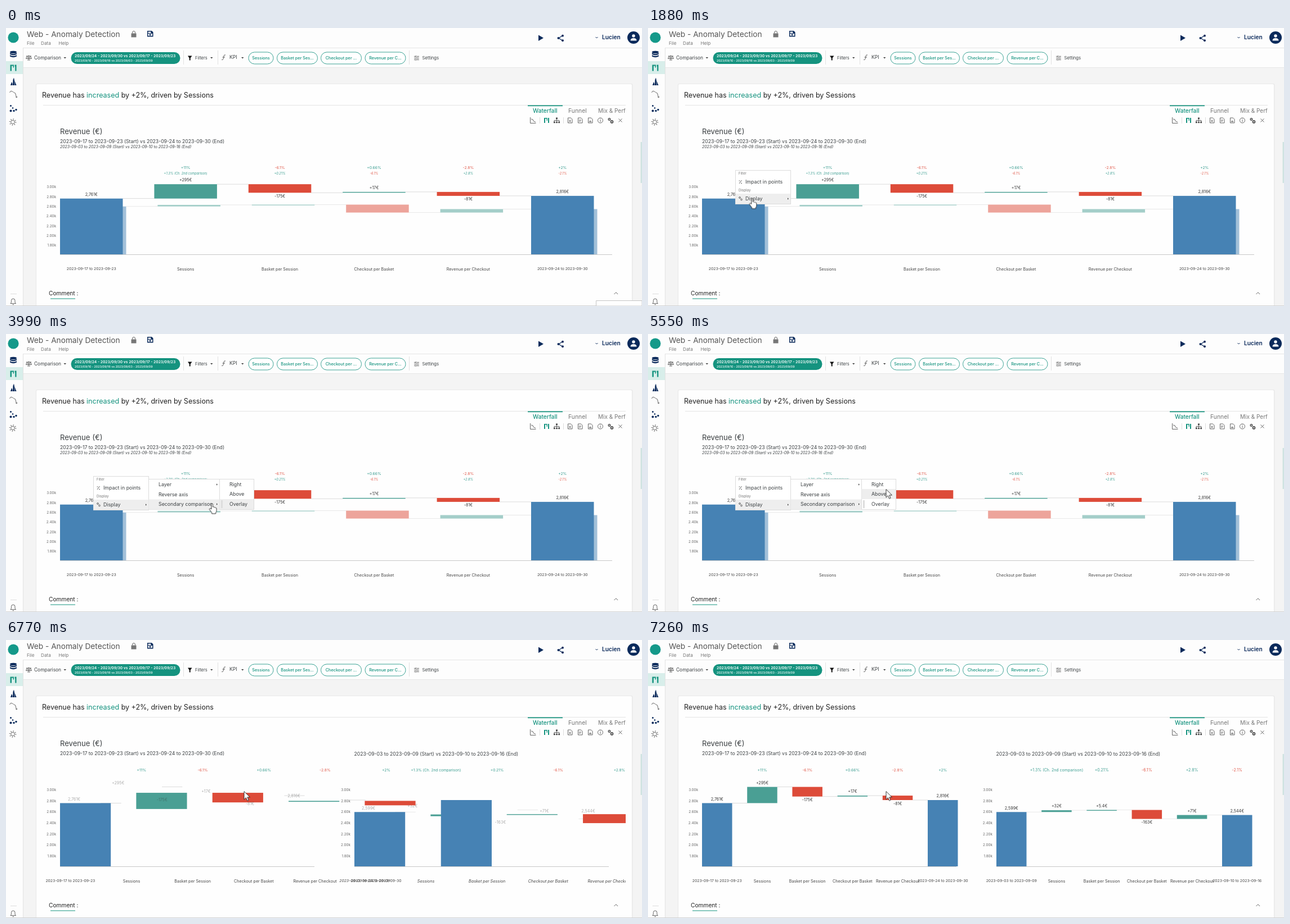
An HTML page that plays this animation: 1130x495 px, repeating every 8000 ms.

```html
<!DOCTYPE html>
<html lang="en">
<head>
<meta charset="utf-8">
<title>Anomaly dashboard</title>
<style>
  html, body { margin: 0; width: 100%; height: 100%; overflow: hidden; background: #f4f4f4; }
  svg { display: block; width: 100%; height: 100%; font-family: Inter, "Open Sans", sans-serif; }
  .navy { fill: #0b2a5b; }
  .line { fill: none; stroke: #555; stroke-width: .9; }
  .teal { fill: #15937f; }
</style>
</head>
<body>
<svg id="stage" viewBox="0 0 1130 495">
  <defs><clipPath id="plot"><rect x="66" y="190" width="1034.500" height="250"/></clipPath></defs>

  <!-- page, header, sidebar -->
  <rect width="1130" height="495" fill="#f4f4f4"/>
  <rect width="1130" height="70" fill="#fdfdfd"/>
  <path d="M31 35.500H1130M31 70.500H1130" stroke="#e6e6e6" fill="none"/>
  <rect width="30" height="495" fill="#fdfdfd"/>
  <path d="M30.500 35V495" stroke="#e2e2e2"/>
  <rect y="59" width="30" height="23" fill="#d8eeea"/>
  <rect x="53" y="99" width="1060.500" height="400" rx="2" fill="#e9e9e9"/>
  <rect x="54" y="100" width="1058" height="400" rx="2" fill="#fefefe"/>
  <rect x="1127.500" y="203" width="2.500" height="73" fill="#cfe3e1"/>

  <!-- sidebar icons -->
  <circle cx="13" cy="17" r="9.600" fill="#15998a"/>
  <g class="navy">
    <path d="M7 43a6 2.300 0 0 1 12 0a6 2.300 0 0 1-12 0M7 44.500q6 3.500 12 0v2.300q-6 3.500-12 0zM7 48.300q6 3.500 12 0v2.300q-6 3.500-12 0z"/>
    <path d="M8 102l2-6 1.500 3v3zM12 102l.5-10 1.500-3.500 1 5v8.500zM15.500 102v-8l3 8z"/>
    <circle cx="8.500" cy="138.500" r="1.500"/><circle cx="12" cy="142.500" r="1.300"/><circle cx="8.500" cy="147.500" r="2"/>
    <circle cx="14" cy="147.500" r="1.700"/><circle cx="18" cy="145.500" r="1.700"/>
  </g>
  <path class="teal" d="M7.500 65.500h2.500v11h-2.500zM10 65.500h3v2h-3zM12.500 65.500h1.500v5h-1.500zM15.500 65.500h3v11h-2.300v-8h-.7z"/>
  <path class="line" d="M6.500 115q1.500-4 4-2.500t3 2 3 1.500l2 7M17 122.500l2 1.500 1-2"/>
  <g class="line" stroke="#888"><circle cx="12" cy="167.500" r="3.300"/><circle cx="12" cy="167.500" r="5.300" stroke-dasharray="1 3.160" stroke-width="2"/></g>
  <path d="M8 473.500H19" stroke="#ddd"/>
  <path class="line" d="M8 490.500h9.500l-1.500-2v-3q0-3.500-3.300-3.500t-3.300 3.500v3zM11.500 492.500h2.500"/>

  <!-- header icons -->
  <path fill="#777" d="M222.500 9.500h9v7h-9z"/><path class="line" stroke="#777" d="M224.500 9.500v-1.500a2.500 2.500 0 0 1 5 0v1.500"/>
  <path class="navy" fill-rule="evenodd" d="M251 5h8l2.500 2.500v8h-10.500zM252.500 6.500v2.500h5v-2.500zM252.500 10v4h7.500v-4z"/><circle class="navy" cx="256" cy="12" r="1.500"/>
  <path class="navy" d="M946 12.500l9 5.300-9 5.300z"/>
  <path d="M989 13.500l-7 4.500 7 4.500" fill="none" stroke="#0b2a5b" stroke-width="1.200"/>
  <g class="navy"><circle cx="989" cy="13.800" r="2"/><circle cx="981.500" cy="18" r="2"/><circle cx="989" cy="22.300" r="2"/><circle cx="1115" cy="17" r="11"/></g>
  <path d="M1047.500 16l2 2 2-2" fill="none" stroke="#0b2a5b"/>
  <g fill="#fff"><circle cx="1115" cy="14" r="2.700"/><path d="M1109.700 22.500v-1.500q1-3 5.300-3t5.300 3v1.500z"/></g>

  <!-- toolbar -->
  <path class="line" d="M36 50h9M40.500 48.500v8M38 57h5M37.500 50l-2 4.500h4zM43.500 50l-2 4.500h4z"/>
  <g fill="#444"><path d="M102.500 52h4.500l-2.200 2.500zM363 52h4.500l-2.200 2.500zM418 52h4.500l-2.200 2.500z"/><path d="M323 49.500h7.500l-2.800 4v4h-2v-4z" fill="#111"/></g>
  <path d="M315.500 40v25M376.500 40v25M716.500 40v25" stroke="#e2e2e2"/>
  <path class="line" d="M390 48q-2.500-1-3 2l-1 5q-.7 2.500-2.800 1.500M384.500 52h4.500M725 50.500h3M730 50.500h4M725 53.500h5M732 53.500h2M725 56.500h2M729 56.500h5M728.500 49v3M731 52v3M728 55v3"/>
  <rect class="teal" x="115.500" y="43" width="194" height="21" rx="10.500"/>
  <g fill="#fff" stroke="#3aa294"><rect x="431" y="43" width="44" height="21" rx="10.500"/><rect x="481.500" y="43" width="72" height="21" rx="10.500"/><rect x="559.500" y="43" width="72" height="21" rx="10.500"/><rect x="638" y="43" width="72" height="21" rx="10.500"/></g>

  <!-- card -->
  <path d="M66 137.500H1101" stroke="#e4e4e4"/>
  <rect class="teal" x="927" y="137.500" width="62" height="1.700"/>
  <path class="line" d="M931.500 159v10.500h10M933 162l3 1 1.500 3 3.500 1.500M974 166.500v-2h9v2M978.500 161v5"/>
  <path d="M948.500 159v11M990.500 159v11" stroke="#ddd"/>
  <path class="teal" d="M956 160h2v9h-2zM958 160h3v1.500h-3zM960.500 160h1.300v5h-1.300zM963 160h2v9h-2z"/>
  <path fill="#444" d="M977 159.500h3v2.500h-3zM973 166.500h2.700v2.700h-2.700zM977.200 166.500h2.700v2.700h-2.700zM981.300 166.500h2.700v2.700h-2.700z"/>
  <g id="docs"></g>
  <g class="line"><circle cx="1056" cy="164.500" r="4.500"/><path d="M1056 163.500v3.500M1056 161.500v1"/>
    <circle cx="1072" cy="162.500" r="1.700" stroke-width="1.600"/><circle cx="1076.500" cy="167" r="2" stroke-width="1.800"/>
    <path d="M1088.500 161.500l6 6M1094.500 161.500l-6 6"/></g>
  <rect class="teal" x="79" y="481.500" width="44" height="1"/>
  <path class="line" d="M1080.500 474l3.300-3.300 3.300 3.300" stroke-width="1.200"/>
  <g id="texts"></g>
  <g id="charts" clip-path="url(#plot)"></g>
  <path d="M0 494.500H1130" stroke="#d2d2d2"/>
  <path id="toast" d="M1048.500 495V485.500H1130V495z" fill="#fff" stroke="#c4c4c4"/>
  <g id="menus"></g>

  <g id="cursor">
    <path id="arrow" d="M0 0V14.500l3.400-3.200 2.300 5.300 2.400-1-2.300-5.200h4.700z" fill="#fff" stroke="#222" stroke-width=".9"/>
    <g id="zoom"><path d="M3 3l4 4" stroke="#111" stroke-width="2.400"/><circle r="5" fill="#fff" stroke="#111" stroke-width="1.300"/><path d="M-3 0h6M0-3v6" stroke="#111" stroke-width="1.700"/></g>
    <path id="hand" d="M-1.500 10V1.500q0-1.500 1.300-1.500t1.300 1.500V6q2-.8 2.500.6q2-.4 2.300.8q1.700 0 1.700 1.500v4q0 2-1.400 3.200V18h-7v-2L-4.600 11q-1-1.800.4-2.400t2.700 1.400z" fill="#fff" stroke="#222" stroke-width=".9"/>
  </g>
</svg>
<script>
const LOOP = 8000, SPLIT = 6300;
const BAR_WINDOW = [6490, 7112], SIZE_WINDOW = [SPLIT, 6680], AXIS_WINDOW = [6480, 6995], SETTLE = [7130, 7260];
const HOLD = 'steps(1, end)', CUBIC = 'cubic-bezier(.65, 0, .35, 1)';
const GREEN = '#4a9f94', RED = '#dd4b39', BLUE = '#4682b4', TEAL = '#15937f';
const byId = id => document.getElementById(id);
const px = v => `${v}px`;
const at = (x, y, scale = 1) => `translate(${x}px, ${y}px) scale(${scale})`;

function add(parent, tag, attrs = {}, text = '') {
  const el = document.createElementNS('http://www.w3.org/2000/svg', tag);
  for (const name in attrs) el.setAttribute(name, attrs[name]);
  el.textContent = text;
  return parent.appendChild(el);
}

// y is the middle of the capitals
function label(parent, text, x, y, size, attrs = {}) {
  return add(parent, 'text', { x, y: y + size * .36, 'font-size': size, fill: '#3c4043', ...attrs }, text);
}

function track(el, prop, steps) {
  const keys = steps.map(([t, value, easing = HOLD]) => ({ offset: t / LOOP, [prop]: value, easing }));
  keys.push({ offset: 1, [prop]: steps.at(-1)[1] });
  el.animate(keys, { duration: LOOP, iterations: Infinity });
}

// joined value, then a jump to `start` at the split, eased to `end`
const glide = (el, prop, joined, start, end, [from, to]) =>
  track(el, prop, [[0, joined], [SPLIT, start], [from, start, CUBIC], [to, end]]);

const show = (el, from, to = LOOP) =>
  track(el, 'opacity', [[0, from ? 0 : 1], [from, 1], [to, to < LOOP ? 0 : 1]]);

// ---- static text ----
const texts = byId('texts');
const put = (text, x, y, size, attrs) => label(texts, text, x, y, size, attrs);
put('Web - Anomaly Detection', 37, 11.5, 13.7, { fill: '#555' });
['File', 'Data', 'Help'].forEach((t, i) => put(t, [37, 62, 93.5][i], 27, 8.2, { fill: '#777' }));
put('Lucien', 1059, 16.5, 10.2, { fill: '#0b2a5b', 'font-weight': 600 });
put('Comparison', 50, 53, 8.4);
put('Filters', 336, 53, 7.5);
put('KPI', 397, 52, 8.6);
put('Settings', 739.5, 53, 7.7);
put('2023/09/24 - 2023/09/30 vs 2023/09/17 - 2023/09/23', 122, 50, 6.7, { fill: '#fff', 'font-weight': 600 });
put('2023/09/10 - 2023/09/16 vs 2023/09/03 - 2023/09/09', 122, 57.7, 5.25, { fill: '#fff', 'font-weight': 500 });
['Sessions', 'Basket per Ses...', 'Checkout per ...', 'Revenue per C...'].forEach((t, i) =>
  put(t, [453, 517.5, 595.5, 674][i], 53, 7.3, { fill: TEAL, 'font-weight': 500, 'text-anchor': 'middle' }));
const headline = put('Revenue has ', 64, 119, 12.5, { fill: '#222' });
add(headline, 'tspan', { fill: TEAL }, 'increased');
add(headline, 'tspan', {}, ' by +2%, driven by Sessions');
put('Waterfall', 936, 147, 10.2, { fill: TEAL, 'font-weight': 500 });
put('Funnel', 999, 147, 10.4, { fill: '#777' });
put('Mix & Perf', 1052, 147, 10, { fill: '#777' });
put('Revenue (€)', 96, 184, 13.1);
put('2023-09-17 to 2023-09-23 (Start) vs 2023-09-24 to 2023-09-30 (End)', 96, 202, 8.65);
put('Comment :', 76, 472, 10.2, { fill: '#222' });
put('The revenue has increased', 118, 497.5, 7);
const second = '2023-09-03 to 2023-09-09 (Start) vs 2023-09-10 to 2023-09-16 (End)';
show(put(second, 96, 212, 6.9, { 'font-style': 'italic' }), 0, SPLIT);
show(put(second, 618.5, 202.5, 8.65), SPLIT);

const glyphs = ['m-1.500 163.500l3 4m0-4l-3 4', 'm-2 164h4m-4 2h3', 'm-2 167l2-2 2 2z'];
glyphs.forEach((glyph, i) => add(byId('docs'), 'path', { class: 'line', transform: `translate(${1002 + i * 18})`,
  d: `M-3.500 160h5l2.500 2.500v6.500h-7.500z${glyph.replace('m', 'M')}` }));

// ---- waterfall charts ----
const BASE = 403;
const JOINED = { pitch: 167.4, width: 111.5, y: v => 387 - (v - 1800) * .0867 };
const APART = { pitch: 80.2, width: 53.5, y: v => 384.5 - (v - 1800) * .0979 };
const STEPS = ['Sessions', 'Basket per Session', 'Checkout per Basket', 'Revenue per Checkout'];

const middle = (parent, text, size, fill) => label(parent, text, 0, 0, size, { fill, 'text-anchor': 'middle' });
const euros = v => v.toLocaleString('en-US', { maximumFractionDigits: Math.abs(v) < 10 ? 1 : 0 }) + '€';

function chart({ left, home, main, start, deltas, rates, dates }) {
  const g = add(byId('charts'), 'g');
  const centre = (x, mode, i) => x + mode.width / 2 + i * mode.pitch;
  const levels = deltas.reduce((all, d) => [...all, all.at(-1) + d], [start]);
  const bars = [[0, start], ...deltas.map((d, i) => [levels[i], levels[i + 1]]), [0, levels[4]]];

  for (let i = 0; i < 7; i++) {
    const v = 3000 - i * 200;
    const tick = label(g, (v / 1000).toFixed(2) + 'k', 0, 0, 6.3, { fill: '#666', 'text-anchor': 'end' });
    const x = home - 7;
    glide(tick, 'transform', at(x, JOINED.y(v)), at(x, JOINED.y(v)), at(x, APART.y(v)), [SPLIT, 6500]);
    if (!main) show(tick, SPLIT);
  }

  const floor = add(g, 'rect', { x: home, y: BASE, width: 452, height: .8, fill: '#bbb' });
  if (main) track(floor, 'width', [[0, '981px'], [SPLIT, '452px']]);
  else show(floor, SPLIT);

  for (let i = 0; i < 5; i++) {
    const link = add(g, 'rect', { height: .8, fill: main ? '#d2d2d2' : '#e2e2e2' });
    const from = mode => mode.width + i * mode.pitch;
    const gap = mode => px(mode.pitch - mode.width);
    glide(link, 'x', px(left + from(JOINED)), px(home + from(JOINED)), px(home + from(APART)), AXIS_WINDOW);
    glide(link, 'width', gap(JOINED), gap(JOINED), gap(APART), AXIS_WINDOW);
    track(link, 'y', [[0, px(JOINED.y(levels[i]) - .4)], [SPLIT, px(APART.y(levels[i]) - .4)]]);
  }

  bars.forEach(([a, b], i) => {
    const total = a === 0, down = b < a;
    const top = mode => mode.y(Math.max(a, b));
    const height = mode => total ? BASE - top(mode) : Math.max(1.4, mode.y(Math.min(a, b)) - top(mode));
    const bar = add(g, 'rect', { fill: total ? BLUE : down ? RED : GREEN });
    const x = (origin, mode) => px(origin + i * mode.pitch);
    glide(bar, 'x', x(left, JOINED), x(home, JOINED), x(home, APART), BAR_WINDOW);
    glide(bar, 'width', px(JOINED.width), px(JOINED.width), px(APART.width), BAR_WINDOW);
    glide(bar, 'y', px(top(JOINED)), px(top(JOINED)), px(top(APART)), total ? SIZE_WINDOW : BAR_WINDOW);
    glide(bar, 'height', px(height(JOINED)), px(height(JOINED)), px(height(APART)), SIZE_WINDOW);
    if (!main) track(bar, 'opacity', [[0, .5], [SPLIT, 1]]);

    const amount = total ? euros(b) : (down ? '' : '+') + euros(deltas[i - 1]);
    const value = middle(g, amount, 7.1, '#333');
    const valueY = mode => down && !total ? mode.y(b) + 6 : top(mode) - 7.3;
    glide(value, 'transform', at(centre(96, JOINED, i), valueY(JOINED)),
      at(home + 25 + i * 78.1, valueY(APART)), at(centre(home, APART, i), valueY(APART)), SETTLE);
    track(value, 'opacity', [[0, main ? 1 : 0], [SPLIT, 0], [6700, 0, 'linear'], [6880, 1]]);

    const axis = middle(g, total ? dates[i && 1] : STEPS[i - 1], total ? 6.8 : 7.2, '#444');
    glide(axis, 'transform', at(centre(96, JOINED, i), 429),
      at(home + 1 + i * JOINED.pitch, 429), at(centre(home, APART, i), 429), AXIS_WINDOW);
    if (!main) {
      show(axis, SPLIT);
      track(axis, 'fontStyle', [[0, 'italic'], [SETTLE[0], 'normal']]);
    }

    if (!i) return;
    const text = rates[i - 1];
    const rate = middle(g, text, main ? 6.8 : 5.7, text[0] === '+' ? '#3a9d90' : '#e0594a');
    glide(rate, 'transform', at(centre(96, JOINED, i), main ? 249 : 258.5),
      at(centre(home, JOINED, i), 231.5), at(centre(home, APART, i), 231.5, main ? 1 : 1.23), AXIS_WINDOW);
    if (!main) track(rate, 'fontStyle', [[0, 'italic'], [SPLIT, 'normal']]);
  });
}

chart({ left: 102, home: 619, main: false, start: 2599, deltas: [32, 5.4, -163, 71],
  rates: ['+1.3% (Ch. 2nd comparison)', '+0.21%', '-6.1%', '+2.8%', '-2.1%'],
  dates: ['2023-09-03 to 2023-09-09', '2023-09-10 to 2023-09-16'] });
chart({ left: 96, home: 96, main: true, start: 2761, deltas: [294.6, -175, 16.7, -81],
  rates: ['+11%', '-6.1%', '+0.66%', '-2.8%', '+2%'],
  dates: ['2023-09-17 to 2023-09-23', '2023-09-24 to 2023-09-30'] });

// ---- context menus ----
function menu(x, y, width, height, from) {
  const g = add(byId('menus'), 'g');
  add(g, 'rect', { x: x + .5, y: y + .5, width, height, fill: '#fff', stroke: '#dcdcdc' });
  show(g, from, SPLIT);
  return g;
}
const hover = (g, x, y, width, from, to) =>
  show(add(g, 'rect', { x, y, width, height: 18, fill: '#eee' }), from, to);
const more = (g, x, y) => add(g, 'path', { d: `M${x} ${y - 1.7}l1.800 1.700-1.800 1.700z`, fill: '#333' });
const item = (g, text, x, y) => label(g, text, x, y, 8.8);

const root = menu(155, 253, 98, 60, 1340);
hover(root, 155.5, 295, 97.5, 1880, SPLIT);
label(root, 'Filter', 161, 259, 5.8, { fill: '#777' });
item(root, 'Impact in points', 173, 274);
label(root, 'Display', 161, 289, 6.2, { fill: '#777' });
item(root, 'Display', 173, 304);
more(root, 248, 304);
add(root, 'path', { class: 'line', d: 'M162 277l4.500-6M161.500 272h2M165 276.500h2' });
for (const [cx, cy] of [[163, 302], [166, 305.5]]) add(root, 'circle', { cx, cy, r: 1.4, class: 'line', 'stroke-width': 1.3 });

const display = menu(253, 258, 126, 54, 2370);
hover(display, 253.5, 294.5, 125.5, 3370, SPLIT);
['Layer', 'Reverse axis', 'Secondary comparison'].forEach((t, i) => item(display, t, 271, 268 + i * 17.6));
more(display, 374, 268);
more(display, 374, 303);

const placement = menu(379, 258, 61, 54, 3430);
hover(placement, 379.5, 294, 60.5, 3960, 4550);
hover(placement, 379.5, 276, 60.5, 4550, 5640);
hover(placement, 379.5, 258.5, 60.5, 5640, SPLIT);
add(placement, 'rect', { x: 382, y: 296, width: 3, height: 14, fill: '#ddd' });
['Right', 'Above', 'Overlay'].forEach((t, i) => item(placement, t, 397, 267.5 + i * 17.6));

// ---- pointer ----
show(byId('toast'), 0, 70);
const EASE = 'ease-in-out';
track(byId('cursor'), 'transform', [
  [0, at(1200, 520)],
  [460, at(1067, 484), 'linear'], [700, at(780, 345), 'linear'], [900, at(430, 272), 'linear'],
  [1080, at(190, 305), 'ease-out'], [1210, at(154.5, 323)],
  [1340, at(154.5, 323), EASE], [1950, at(186, 303)],
  [2280, at(186, 303), EASE], [2620, at(215.5, 304.5)],
  [3100, at(215.5, 304.5), EASE], [3510, at(313, 302)],
  [3780, at(313, 302), EASE], [4200, at(419, 302)],
  [4400, at(419, 302), EASE], [4750, at(423, 282)],
  [5550, at(423, 276.5), EASE], [5830, at(423, 269.5)],
]);
track(byId('arrow'), 'opacity', [[0, 1], [1060, 0], [5550, 1]]);
show(byId('zoom'), 1060, 1400);
show(byId('hand'), 1400, 5550);
</script>
</body>
</html>
```
